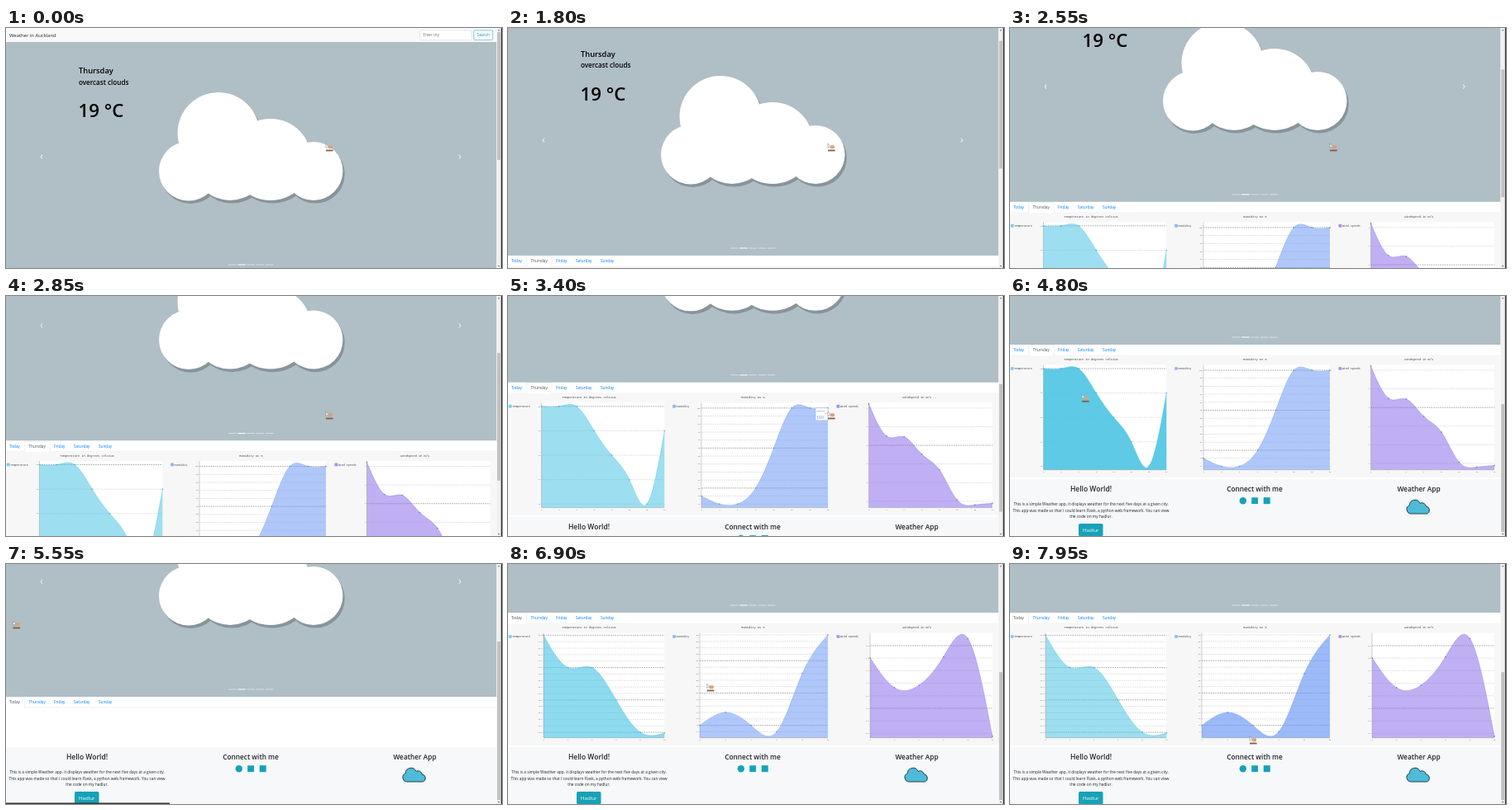
Recreate the animation shown at these times as an HTML page. Size 600x291 px, loop 8000 ms.

```html
<!DOCTYPE html>
<html lang="en">
<head>
<meta charset="utf-8">
<title>Weather</title>
<style>
  html, body { margin: 0; width: 100%; height: 100%; overflow: hidden; background: #fff; }
  svg { display: block; width: 100vw; height: 100vh; }
  text { font-family: "Open Sans", "Noto Sans", sans-serif; fill: #212529; white-space: pre; }
  .semi { font-weight: 600; }
  .mid { text-anchor: middle; }
  .end { text-anchor: end; }
  .mono { font-family: "Liberation Mono", monospace; fill: #444; }
  .tick { font-size: 2.1px; fill: #555; }
</style>
</head>
<body>
<svg id="stage" viewBox="0 0 600 291" preserveAspectRatio="none"></svg>
<script>
const LOOP = 8000, VIEW = 291, PAGE = 528, CHART_SHRINK = 102;
const SWITCH = 5550, LOADED = 5900;
const IDLE = 0.55, HOVER = 0.9;

const rect = (x, y, w, h, fill, extra = '') =>
  `<rect x="${x}" y="${y}" width="${w}" height="${h}" fill="${fill}" ${extra}/>`;
const text = (x, y, size, str, cls = '', extra = '') =>
  `<text x="${x}" y="${y}" font-size="${size}" class="${cls}" ${extra}>${str}</text>`;
const range = n => [...Array(n).keys()];

function navbar() {
  return rect(0, 0, 593.5, 17, '#f8f9fa') +
    text(4, 11, 5.9, 'Weather in Auckland') +
    rect(500.7, 2.8, 62.3, 11.8, '#fff', 'rx="1.2" stroke="#ced4da" stroke-width=".5"') +
    text(504.5, 10.4, 4.5, 'Enter city', '', 'style="fill:#6c757d"') +
    rect(565.8, 2.8, 23, 11.8, 'none', 'rx="1.2" stroke="#17a2b8" stroke-width=".5"') +
    text(569.8, 10.4, 4.8, 'Search', '', 'style="fill:#17a2b8"');
}

function carousel() {
  const puffs = [[221, 173.5, 36], [257, 127.5, 49.5], [271, 164.5, 44.5], [320, 159.5, 49.5], [372, 173.5, 35.5]]
    .map(([x, y, r]) => `<circle cx="${x}" cy="${y}" r="${r}"/>`).join('');
  const chevron = (x, dir) =>
    `<path d="M${x + dir} 153.7l${-2 * dir} 2.5l${2 * dir} 2.5" fill="none" stroke="#fff" stroke-width="1.1" opacity=".7"/>`;
  const dots = range(5).map(i =>
    rect(269 + i * 11.2, 286.5, 9.6, 1, '#fff', `opacity="${i === 1 ? 1 : 0.5}"`)).join('');
  return rect(0, 17, 593.5, 279, '#b0bec5') +
    `<g fill="#88949a" transform="translate(2.3 3.6)">${puffs}</g><g fill="#fff">${puffs}</g>` +
    text(88, 55.3, 9.3, 'Thursday', 'semi', 'style="fill:#000"') +
    text(88, 68.5, 8.1, 'overcast clouds', 'semi', 'style="fill:#000"') +
    text(87.5, 108, 22.3, '19 °C', 'semi', 'style="fill:#000"') +
    chevron(43, 1) + chevron(549, -1) + dots;
}

function tabs(active) {
  const names = ['Today', 'Thursday', 'Friday', 'Saturday', 'Sunday'];
  const starts = [4, 27.5, 58, 82, 112];
  const [left, right] = active ? [22.7, 53] : [-1, 22.5];
  return rect(0, 296, 593.5, 13.3, '#fff') +
    `<path d="M0 309.2H${left}V296.8H${right}V309.2H593.5" fill="none" stroke="#dee2e6" stroke-width=".5"/>` +
    names.map((name, i) =>
      text(starts[i], 304.2, 4.7, name, '', `style="fill:${i === active ? '#495057' : '#007bff'}"`)).join('');
}

// Slopes of a natural cubic spline over evenly spaced points.
function splineSlopes(ys) {
  const n = ys.length - 1, d = ys.map(() => 0);
  for (let pass = 0; pass < 40; pass++) {
    d[0] = (3 * (ys[1] - ys[0]) - d[1]) / 2;
    for (let i = 1; i < n; i++) d[i] = (3 * (ys[i + 1] - ys[i - 1]) - d[i - 1] - d[i + 1]) / 4;
    d[n] = (3 * (ys[n] - ys[n - 1]) - d[n - 1]) / 2;
  }
  return d;
}

// Chart heights are measured from the top of the fully scrolled view.
const KINDS = [
  { key: 'temp', title: 'Temperature in degrees celcius', legend: 'Temperature', color: '#4dc5e4', left: 0 },
  { key: 'humid', title: 'Humidity as %', legend: 'Humidity', color: '#709cf4', left: 198.3 },
  { key: 'wind', title: 'Windspeed in m/s', legend: 'Wind speeds', color: '#8c6fe9', left: 396.7 },
];
const DAYS = {
  thursday: { hours: 3, charts: [
    { x: [40.5, 189.3], ys: [88, 88, 88, 117.6, 147.2, 176.8, 206.4, 117.6],
      grid: { y: 88, gap: 29.6, n: 5, major: i => i === 0, label: i => 20 - i } },
    { x: [234, 387], ys: [196.7, 206.4, 206.4, 187, 138.5, 90, 90, 90],
      grid: { y: 90, gap: 9.7, n: 13, major: i => i % 5 === 0, label: i => 100 - 2 * i } },
    { x: [436.5, 586], ys: [85, 124, 125, 146, 165, 201.5, 207.5, 205.5],
      grid: { y: 90, gap: 22.6, n: 6, major: i => i === 2, label: i => 7 - i } },
  ] },
  today: { hours: 3, charts: [
    { x: [43, 189.3], ys: [86.3, 125.5, 125.5, 164.8, 204, 205],
      grid: { y: 86.3, gap: 7.85, n: 16, major: i => i % 5 === 0, label: i => (22 - i / 5).toFixed(1) } },
    { x: [232, 387], ys: [195.7, 179.9, 195.7, 203.5, 132.8, 86],
      grid: { y: 86, gap: 7.83, n: 16, major: i => i % 5 === 4, label: i => 89 - i } },
    { x: [438, 586], ys: [113.7, 150, 147, 112.5, 90.5, 209],
      grid: { y: 99, gap: 15.2, n: 8, major: i => i % 5 === 0, label: i => (2 - i / 5).toFixed(1) } },
  ] },
};

function chart({ x: [x0, x1], ys, grid }, kind, hours) {
  const base = 210.7, step = (x1 - x0) / (ys.length - 1), d = splineSlopes(ys);
  let curve = `M${x0} ${ys[0]}`;
  for (let i = 1; i < ys.length; i++) {
    const x = x0 + i * step;
    curve += `C${x - step * 2 / 3} ${ys[i - 1] + d[i - 1] / 3} ${x - step / 3} ${ys[i] - d[i] / 3} ${x} ${ys[i]}`;
  }
  const lines = range(grid.n).map(i => {
    const y = grid.y + i * grid.gap, major = grid.major(i);
    return `<path d="M${x0} ${y}H${x1}" stroke="${major ? '#555' : '#aaa'}" stroke-width="${major ? 0.5 : 0.4}" stroke-dasharray="1.6 1.1"/>` +
      text(x0 - 1.6, y + 0.7, 2.1, grid.label(i), 'mono tick end');
  }).join('');
  const marks = ys.map((y, i) => {
    const x = x0 + i * step;
    return `<circle cx="${x}" cy="${y}" r=".75" fill="${kind.color}" stroke="#777" stroke-width=".15"/>` +
      text(x, 214.4, 2.1, i * hours, 'mono tick mid');
  }).join('');
  return rect(x0, 83.5, x1 - x0, base - 83.5, '#fff') + lines +
    `<path class="fill-${kind.key}" d="${curve}V${base}H${x0}Z" fill="${kind.color}"/>` +
    `<path d="${curve}" fill="none" stroke="${kind.color}" stroke-width=".4"/>` +
    `<path d="M${x0} 83.5V${base}H${x1}" fill="none" stroke="#666" stroke-width=".3"/>` + marks +
    text(kind.left + 98, 78.3, 3.65, kind.title, 'mono mid') +
    rect(kind.left + 1, 86.2, 3.4, 3.4, kind.color, `rx=".5" opacity=".75" stroke="${kind.color}" stroke-width=".4"`) +
    text(kind.left + 5.2, 89, 3.3, kind.legend, 'mono');
}

function dayCharts(name) {
  const { hours, charts } = DAYS[name];
  return `<g id="${name}" transform="translate(0 237)">` + rect(0, 72.5, 593.5, 147.5, '#f7f7f7') +
    charts.map((c, i) => chart(c, KINDS[i], hours)).join('') + '</g>';
}

function tooltip() {
  return '<g id="tip">' + rect(372, 327, 15, 15, '#fff', 'stroke="#709cf4" stroke-width=".4"') +
    text(373.2, 331, 2.2, 'Humidity', 'mono tick') + text(385, 334.6, 2.2, '18', 'mono tick end') +
    text(373.2, 340, 4.8, '100', 'mono', 'style="fill:#709cf4"') + '</g>';
}

function footer() {
  const teal = '#17a2b8';
  const lines = [
    'This is a simple Weather app. it displays weather for the next five days at a given city.',
    'This app was made so that I could learn Flask, a python web framework. You can view',
    'the code on my hadlur.',
  ];
  return '<g id="footer">' + rect(0, 459, 593.5, 69, '#f6f8f9') +
    text(98, 474, 8.5, 'Hello World!', 'semi mid') +
    text(296, 474, 8.3, 'Connect with me', 'semi mid') +
    text(494.5, 474, 8.3, 'Weather App', 'semi mid') +
    lines.map((line, i) => text(98, 491.2 + i * 7.5, 4.77, line, 'mid')).join('') +
    rect(83, 513, 29.5, 15, teal, 'rx="1.5"') +
    text(97.8, 523.2, 6.1, 'Hadlur', 'mid', 'style="fill:#fff"') +
    `<circle cx="281.8" cy="485.2" r="4.2" fill="${teal}"/>` +
    rect(292.2, 481.3, 7.8, 7.8, teal) + rect(306.7, 481.2, 8, 8, teal) +
    '<path d="M484.5 501A5.3 5.3 0 0 1 483.3 490.8A6.6 6.6 0 0 1 496 488.4A5 5 0 0 1 503.3 492A4.7 4.7 0 0 1 504.5 501Z" fill="#4fbbd9" stroke="#17313c" stroke-width=".9"/></g>';
}

function chrome() {
  return rect(593.5, 0, 5.2, VIEW, '#f1f1f1') + rect(594.2, 0, 3.8, 10, '#c1c1c1', 'id="thumb"') +
    '<path d="M594.9 3.2l1.2-1.4l1.2 1.4zM594.9 288l1.2 1.4l1.2-1.4z" fill="#555"/>' +
    rect(598.8, 0, 1.2, VIEW, '#333') +
    rect(0, 289.5, 198, 1.5, '#3a3a3a', 'id="status"') +
    '<g id="cursor"><path d="M-4-5v5.5l1.4-1.2l2.4.2z" fill="#fff" stroke="#777" stroke-width=".5"/>' +
    rect(-1, -2.8, 5, 4, '#d7a27f', 'rx="1.2"') + rect(-4, 2.6, 8.6, 1.8, '#8a5a42') + '</g>';
}

const $ = id => document.getElementById(id);
$('stage').innerHTML = rect(0, 0, 600, VIEW, '#fff') + '<g id="page">' + navbar() + carousel() +
  `<g id="tabs-today">${tabs(0)}</g><g id="tabs-thursday">${tabs(1)}</g>` +
  dayCharts('thursday') + dayCharts('today') + tooltip() + footer() + '</g>' + chrome();

// Interpolates keys of the form [time, ...values].
function track(keys, t) {
  const next = keys.findIndex(k => k[0] > t);
  if (next === 0) return keys[0].slice(1);
  if (next < 0) return keys[keys.length - 1].slice(1);
  const a = keys[next - 1], b = keys[next], p = (t - a[0]) / (b[0] - a[0]);
  return a.slice(1).map((v, i) => v + (b[i + 1] - v) * p);
}

const SCROLL = [[1550, 0], [1800, 20], [2050, 31], [2200, 32], [2550, 85], [3000, 138], [3400, 191], [3650, 223], [3850, 237]];
const CURSOR = [[3850, 391, 145], [4000, 289, 131], [4750, 100, 130], [5250, 12.5, 74], [5750, 12.5, 74],
  [6150, 60, 120], [6350, 110, 150], [7250, 330, 150], [7950, 294, 214]];
const pulse = (a, b, c, d) => [[a, IDLE], [b, HOVER], [c, HOVER], [d, IDLE]];
const FILLS = {
  temp: [...pulse(4500, 4650, 4950, 5150), ...pulse(6250, 6400, 6750, 6950)],
  humid: [...pulse(3850, 3980, 4300, 4550), ...pulse(6900, 7050, 7850, 8020)],
  wind: [[0, IDLE]],
};
const TIP = [[3250, 0], [3380, 1], [4500, 1], [4750, 0]];
const show = (id, on) => $(id).setAttribute('display', on ? 'inline' : 'none');

function draw(t) {
  const today = t >= SWITCH, blank = today && t < LOADED;
  const height = blank ? PAGE - CHART_SHRINK : PAGE;
  const scroll = blank ? height - VIEW : track(SCROLL, t)[0];
  $('page').setAttribute('transform', `translate(0 ${-scroll})`);
  $('footer').setAttribute('transform', `translate(0 ${height - PAGE})`);
  show('tabs-today', today);
  show('tabs-thursday', !today);
  show('today', today && !blank);
  show('thursday', !today);
  show('status', t >= 5200 && t < 5800);
  $('tip').setAttribute('opacity', track(TIP, t)[0]);
  for (const key in FILLS) {
    const opacity = track(FILLS[key], t)[0];
    document.querySelectorAll('.fill-' + key).forEach(el => el.setAttribute('fill-opacity', opacity));
  }
  const ratio = (VIEW - 10) / height;
  $('thumb').setAttribute('y', 5 + scroll * ratio);
  $('thumb').setAttribute('height', VIEW * ratio);
  $('cursor').setAttribute('transform', `translate(${track(CURSOR, t)})`);
}

const start = performance.now();
function tick() {
  draw((performance.now() - start) % LOOP);
  requestAnimationFrame(tick);
}
tick();
</script>
</body>
</html>
```
